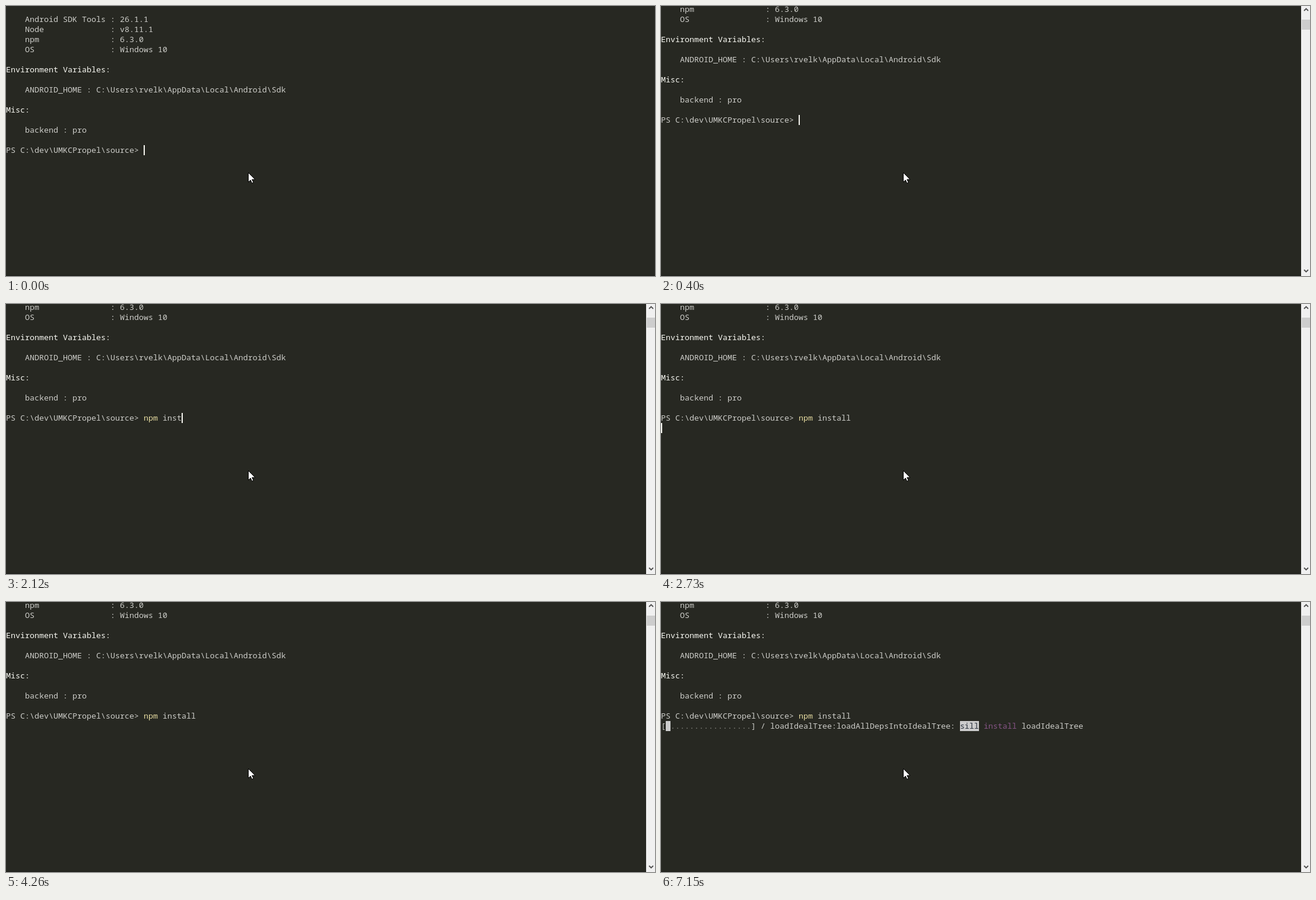
Animation of 1094 by 456 pixels, one loop 8000 ms. Source, as an HTML page:

```html
<!DOCTYPE html>
<html lang="en">
<head>
<meta charset="utf-8">
<title>Terminal: npm install</title>
<style>
  html, body { margin: 0; width: 100%; height: 100%; overflow: hidden; background: #272822; }
  svg { display: block; width: 1094px; height: 456px; }
  text {
    font: 13.3333px "Noto Sans Mono", "DejaVu Sans Mono", monospace;
    font-variant-ligatures: none;
    white-space: pre;
    fill: #ccccc8;
  }
  .head { fill: #f8f8f2; }
  .cmd { fill: #e6dba0; }
  .dim { fill: #85857f; }
  .info { fill: #7a9f1c; }
  .stage { fill: #875587; }
  .dark { fill: #272f3a; }
  .block { fill: #cccccc; }
  .chevron { fill: none; stroke: #505050; stroke-width: 1.8; }
</style>
</head>
<body>
<svg viewBox="0 0 1094 456">
  <rect width="1094" height="456" fill="#272822"/>
  <rect y="454" width="1094" height="2" fill="#20211d"/>

  <g id="log">
    <text y="27">    Android SDK Tools : 26.1.1</text>
    <text y="44">    Node              : v8.11.1</text>
    <text y="61">    npm               : 6.3.0</text>
    <text y="78">    OS                : Windows 10</text>
    <text y="112" class="head">Environment Variables:</text>
    <text y="146">    ANDROID_HOME : C:\Users\rvelk\AppData\Local\Android\Sdk</text>
    <text y="180" class="head">Misc:</text>
    <text y="214">    backend : pro</text>
    <text y="248">PS C:\dev\UMKCPropel\source&gt; <tspan id="tool" class="cmd"></tspan><tspan id="args"></tspan></text>

    <g id="progress">
      <rect class="block" x="8" y="252" width="8" height="17"/>
      <text y="265">[ <tspan class="dim">.................</tspan>]</text>
      <text id="preinstall" x="168" y="265">| preinstall:App: <tspan class="info">info</tspan> <tspan class="stage">lifecycle</tspan> App@0.0.1~preinstall: App@0.0.1</text>
      <g id="loadTree">
        <rect class="block" x="504" y="252" width="32" height="17"/>
        <text x="168" y="265">/ loadIdealTree:loadAllDepsIntoIdealTree: <tspan class="dark">sill</tspan> <tspan class="stage">install</tspan> loadIdealTree</text>
      </g>
    </g>
    <rect id="caret" width="2" height="17" fill="#f4f4ee"/>
  </g>

  <g id="scrollbar">
    <rect x="1079" width="15" height="456" fill="#f0f0f0"/>
    <rect id="thumb" x="1080" width="14" height="17" fill="#cdcdcd"/>
    <path class="chevron" d="M1084 8l3.5-3.5 3.5 3.5M1084 445.500l3.500 3.500 3.500-3.500"/>
  </g>

  <path d="M408.500 281.500v16l3.700-3.500 2.500 5.300 2.500-1.100-2.500-5.200h5.200z"
        fill="#fff" stroke="#000" stroke-width="1"/>
</svg>

<script>
  const LOOP = 8000, ROW = 17, CELL = 8;
  const PROMPT_COL = 29, PROMPT_Y = 235;
  const COMMAND = "npm install";
  const $ = id => document.getElementById(id);

  // Each list holds [start time, value] pairs.
  const scrollRows = [[0, 0], [150, 9], [400, 3]];
  const typed = [[0, 0], [1270, 1], [1390, 2], [1510, 3], [1760, 5], [1880, 6],
                 [2000, 7], [2120, 8], [2240, 9], [2360, 11]];
  const caretOn = [[0, true], [900, false], [1270, true], [3230, false],
                   [3760, true], [4260, false]];
  const ENTER = 2730, PREINSTALL = 4530, LOAD_TREE = 7150;

  const valueAt = (list, t) => list.filter(([start]) => start <= t).pop()[1];
  const show = (id, on) => $(id).setAttribute("visibility", on ? "visible" : "hidden");

  function draw(t) {
    const rows = valueAt(scrollRows, t);
    const count = valueAt(typed, t);
    const text = COMMAND.slice(0, count);
    const entered = t >= ENTER;

    $("log").setAttribute("transform", `translate(0 ${-rows * ROW})`);
    $("tool").textContent = text.slice(0, 3);
    $("args").textContent = text.slice(3);

    $("caret").setAttribute("x", entered ? 0 : (PROMPT_COL + count) * CELL);
    $("caret").setAttribute("y", PROMPT_Y + (entered ? ROW : 0));
    show("caret", valueAt(caretOn, t));

    show("scrollbar", t >= 150);
    $("thumb").setAttribute("y", t < 400 ? 25 : 23);

    show("progress", t >= PREINSTALL);
    show("preinstall", t >= PREINSTALL && t < LOAD_TREE);
    show("loadTree", t >= LOAD_TREE);
  }

  const begin = performance.now();
  function tick() {
    draw((performance.now() - begin) % LOOP);
    requestAnimationFrame(tick);
  }
  tick();
</script>
</body>
</html>
```
